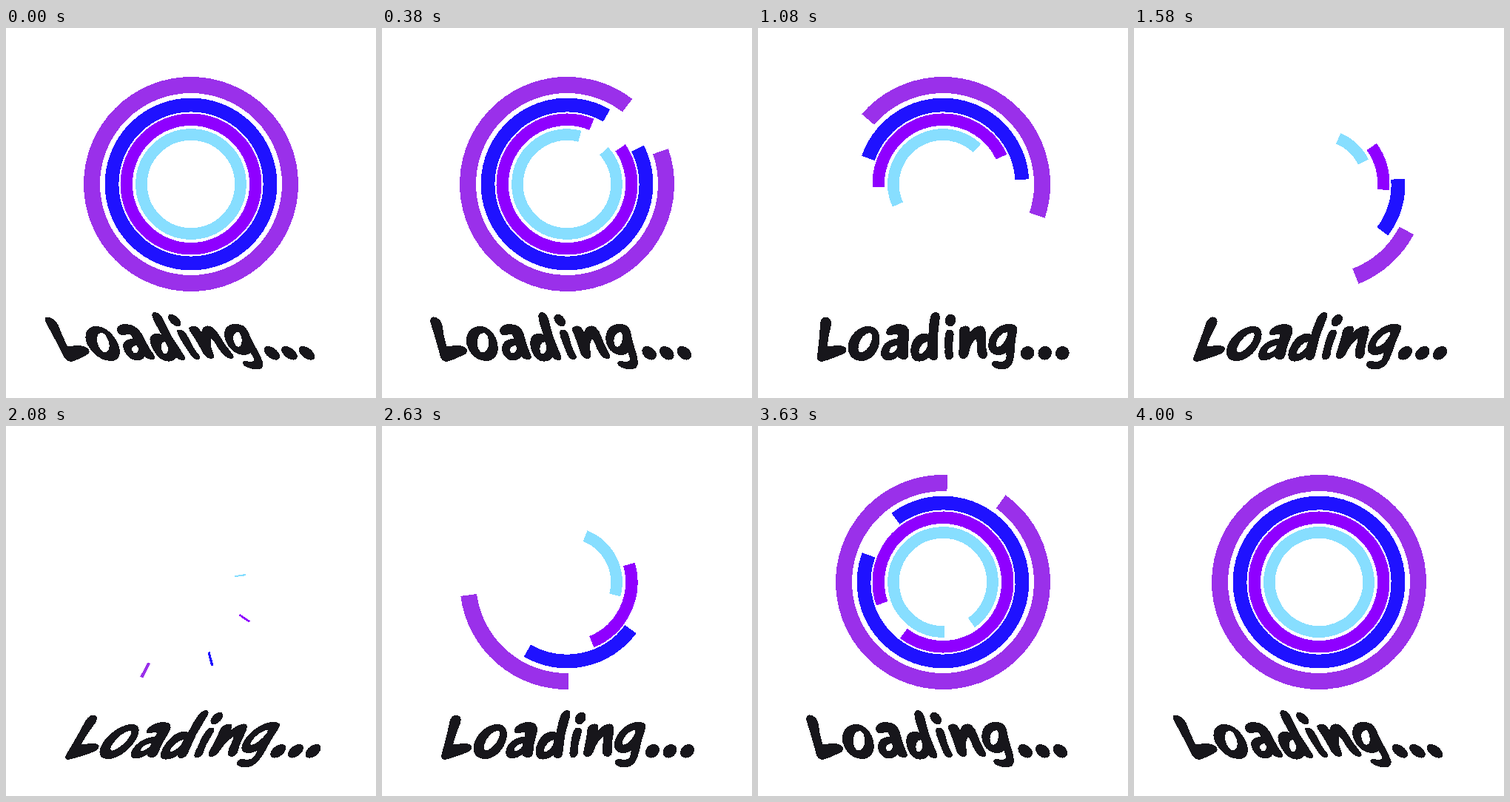
Animation of 500x500 px, one loop 4040 ms. Source, as an HTML page:

```html
<!DOCTYPE html>
<html lang="en">
<head>
<meta charset="utf-8">
<title>Loading</title>
<style>
  html, body { margin: 0; width: 100%; height: 100%; overflow: hidden; background: #fff; }
  svg { display: block; width: 100%; height: 100%; shape-rendering: crispEdges; }
</style>
</head>
<body>
<svg viewBox="0 0 500 500" role="img" aria-label="Loading...">
  <g id="rings" fill="none"></g>
  <g id="word" fill="#17161b" fill-rule="evenodd">
    <path d="M86 391C91 389 98 393 97 401C95 411 93 421 93 430C100 430 108 428 115 430C120 432 120 437 116 440C107 444 95 449 86 451C81 451 79 447 80 442C81 428 82 412 82 400Q82 394 86 391Z"/>
    <path d="M149 403C160 404 165 415 163 427C161 441 150 451 138 450C126 449 120 440 121 428C123 413 136 402 149 403ZM150 412C143 411 136 421 135 430C134 436 137 440 141 438C148 435 153 426 153 418Q153 413 150 412Z"/>
    <path d="M172 413C170 405 180 400 189 400C198 400 203 405 203 413C203 422 201 430 203 440C204 446 201 448 197 448C193 448 190 446 189 444C183 450 174 451 169 447C164 442 165 433 170 427C175 422 181 420 187 420C188 415 187 413 183 414C179 415 174 417 172 413ZM187 429C180 429 176 434 177 438C178 441 184 439 187 433Z"/>
    <path d="M238 384C243 384 244 390 243 396C241 410 241 424 243 438C244 445 243 449 238 449C234 449 232 447 231 445C226 451 214 453 209 447C204 440 205 428 210 420C214 414 222 411 229 414C229 405 229 395 231 389C232 386 235 384 238 384ZM228 424C222 424 217 432 217 438C218 443 225 439 228 431Z"/>
    <path d="M254 408C262 406 264 411 263 418C262 428 262 436 264 442C264 448 259 449 256 448C252 446 252 440 252 434C251 424 250 412 254 408Z"/>
    <ellipse cx="257.8" cy="395" rx="7.3" ry="8.2"/>
    <path d="M276 403C282 401 285 405 285 411C290 404 298 400 303 404C309 410 305 425 309 437C311 444 309 447 304 447C298 447 296 440 295 433C295 428 295 422 293 420C289 424 286 430 285 437C284 444 282 447 277 447C272 447 270 442 271 435C271 425 271 415 270 410C270 406 272 404 276 403Z"/>
    <path d="M346 402C350 405 348 412 347 420C346 430 347 445 344 453C340 463 328 463 320 459C314 456 315 450 321 450C328 451 333 452 335 447C336 444 335 441 335 439C328 444 316 443 312 435C307 424 314 409 325 403C332 399 341 399 346 402ZM335 411C327 411 320 421 321 429C323 434 333 428 336 414Z"/>
    <circle cx="363.8" cy="439.3" r="9.3"/>
    <circle cx="387.4" cy="439.3" r="9.3"/>
    <circle cx="411" cy="439.3" r="9.3"/>
  </g>
</svg>
<script>
  const LOOP = 4040, DURATION = 4000, FPS = 24;
  const CENTER = { x: 250, y: 211 };
  const BASELINE = 447, MAX_SKEW = 30;

  // Innermost first; speed is in degrees per second.
  const rings = [
    { r: 67, width: 15.6, color: '#87deff', speed: 40 },
    { r: 87.3, width: 16.4, color: '#8f00ff', speed: 60 },
    { r: 107, width: 18.8, color: '#1f12ff', speed: 80 },
    { r: 134, width: 22, color: '#9a30ea', speed: 100 }
  ];

  const word = document.getElementById('word');

  for (const ring of rings) {
    const el = document.createElementNS('http://www.w3.org/2000/svg', 'circle');
    const attrs = {
      cx: CENTER.x, cy: CENTER.y, r: ring.r, pathLength: 360,
      stroke: ring.color, 'stroke-width': ring.width
    };
    for (const [name, value] of Object.entries(attrs)) el.setAttribute(name, value);
    document.getElementById('rings').append(el);
    ring.el = el;
  }

  const smooth = u => u * u * (3 - 2 * u);

  function drawRing({ el, speed }, seconds, length) {
    const start = speed * seconds - length - 90;
    el.setAttribute('visibility', length > 0.01 ? 'visible' : 'hidden');
    el.setAttribute('stroke-dasharray', length > 359.99 ? 'none' : `${length} 360`);
    el.setAttribute('transform', `rotate(${start} ${CENTER.x} ${CENTER.y})`);
  }

  function draw(ms) {
    const frame = Math.min(Math.floor(ms * FPS / 1000 + 0.1), DURATION * FPS / 1000);
    const seconds = frame / FPS;
    // 1 at both ends of the loop, 0 halfway through
    const distance = Math.abs(seconds * 2000 / DURATION - 1);

    for (const ring of rings) drawRing(ring, seconds, 360 * smooth(distance));

    const skew = MAX_SKEW * (2 * distance - 1);
    word.setAttribute('transform',
      `translate(0 ${BASELINE}) skewX(${skew}) translate(0 ${-BASELINE})`);
  }

  const begin = performance.now();
  function tick() {
    draw((performance.now() - begin) % LOOP);
    requestAnimationFrame(tick);
  }
  tick();
</script>
</body>
</html>
```
